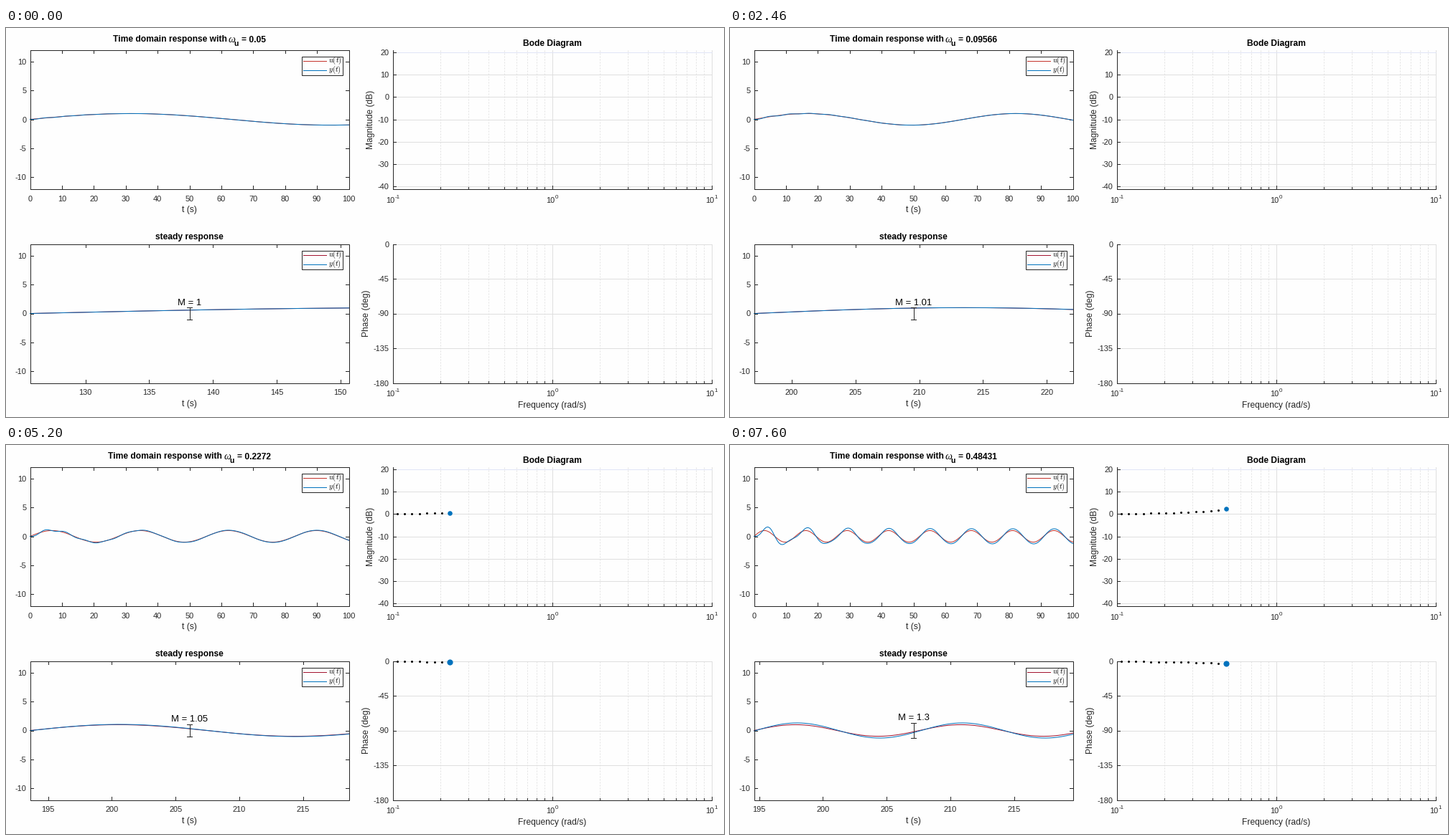
Write a matplotlib script that moves like this. It is 1000 by 543 pixels and loops after 8000 ms.

```python
import numpy as np
import matplotlib.pyplot as plt
from matplotlib.animation import FuncAnimation
from matplotlib.patches import Rectangle

plt.rcParams["font.family"] = "Liberation Sans"
plt.rcParams["mathtext.fontset"] = "cm"

W, H, PX = 1000, 543, 0.72          # stage in pixels, points per pixel
INK, PAPER = "#262626", "#fefefe"
BLUE, RED, DARK_RED = "#0072bd", "#c4342c", "#a2142f"
GRID, MINOR_GRID, TOP_GRID = "#dfdfdf", "#e2e2e2", "#e0e4f6"
ZETA = 0.05                         # damping, natural frequency is 1 rad/s
OMEGAS = np.geomspace(0.05, 10, 50)
STEP_MS, LOOP_MS = 40, 8000
CHANGES = [800, 1060, 1460, 1860, 2130, 2460, 2730, 3130, 3460, 3860, 4200,
           4530, 4860, 5200, 5660, 6000, 6330, 6530, 6860, 7200, 7600]

fig = plt.figure(figsize=(W / 100, H / 100), dpi=100, facecolor=PAPER)
ax = fig.add_axes([0, 0, 1, 1])
ax.set(xlim=(0, W), ylim=(H, 0))
ax.axis("off")


class Panel:
    """Maps data values to stage pixels inside one plot area."""

    def __init__(self, left, top, xlim, ylim):
        self.left, self.right = left, left + 444
        self.top, self.bottom = top, top + 194
        self.xlim, self.ylim = xlim, ylim

    def x(self, v):
        lo, hi = self.xlim
        return self.left + (np.asarray(v) - lo) / (hi - lo) * 444

    def y(self, v):
        lo, hi = self.ylim
        return self.bottom - (np.asarray(v) - lo) / (hi - lo) * 194


def text(x, y, s, size=11, color=INK, ha="center", **kw):
    return ax.text(x, y, s, fontsize=size * PX, color=color, ha=ha,
                   va=kw.pop("va", "baseline"), **kw)


def title(x, y, s, ha="center"):
    return text(x, y, s, 12, "black", ha, weight="bold")


def line(x, y, color=INK, width=1.0, **kw):
    return ax.plot(x, y, color=color, lw=width * PX, **kw)[0]


def dots(color, radius, zorder):
    return line([], [], color, ls="", marker="o", ms=2 * radius * PX, mew=0,
                zorder=zorder)


def join(segments):
    """Pack separate segments into one broken polyline."""
    xs, ys = [], []
    for x0, y0, x1, y1 in segments:
        xs += [x0, x1, np.nan]
        ys += [y0, y1, np.nan]
    return xs, ys


def x_ticks(p, positions, length=4.4):
    return join([s for x in positions for s in
                 ((x, p.bottom, x, p.bottom - length), (x, p.top, x, p.top + length))])


def y_labels(p, values):
    for v in values:
        text(p.left - 5, p.y(v) + 4, f"{v}", ha="right")


def legend(p, u_color):
    ax.add_patch(Rectangle((411.5, p.top + 9), 57, 26.5, fc=PAPER, ec=INK,
                           lw=PX, zorder=6))
    for dy, color, name in ((15, u_color, "u"), (28, BLUE, "y")):
        line([414, 446], [p.top + dy] * 2, color, zorder=7)
        text(449, p.top + dy, f"${name}(t)$", 10.5, "black", "left",
             va="center", zorder=7)


def time_panel(p, u_color):
    ax.add_patch(Rectangle((p.left, p.top), 444, 194, fill=False, ec=INK,
                           lw=PX, zorder=4))
    values = range(-10, 11, 5)
    line(*join([s for y in p.y(values) for s in
                ((p.left, y, p.left + 4.4, y), (p.right, y, p.right - 4.4, y))]))
    y_labels(p, values)
    text(255.5, p.bottom + 32.5, "t (s)", 12)
    legend(p, u_color)
    return line([], [], u_color, zorder=2), line([], [], BLUE, zorder=3)


def bode_panel(p, values, label, label_x):
    minors = p.x(np.log10([k / 10 for k in range(2, 10)] + list(range(2, 10))))
    for x in minors:
        line([x, x], [p.top, p.bottom], MINOR_GRID, ls=(0, (2, 2)), zorder=0)
    for x in p.x([0, 1]):
        line([x, x], [p.top, p.bottom], GRID, zorder=0)
    for v in values:
        line([p.left, p.right], [p.y(v)] * 2, TOP_GRID if v == 20 else GRID,
             zorder=0)
    line([p.left, p.left, p.right], [p.top, p.bottom, p.bottom])
    ticks = [(p.left, y, p.left + 4.4, y) for y in p.y(values)]
    ticks += [(x, p.bottom, x, p.bottom - 4.4) for x in p.x([-1, 0, 1])]
    ticks += [(x, p.bottom, x, p.bottom - 2.2) for x in minors]
    line(*join(ticks))
    y_labels(p, values)
    for power in (-1, 0, 1):
        split = p.x(power) + (2.5 if power < 0 else 4)
        text(split, p.bottom + 19, "10", ha="right")
        text(split + 0.3, p.bottom + 13, f"{power}", 8, ha="left")
    text(label_x, (p.top + p.bottom) / 2, label, 12, rotation=90, va="center")


def gain(w):
    return 1 / (1 - w**2 + 2j * ZETA * w)


def response(w, t):
    """Output of the resting second-order system driven by sin(w t)."""
    m, phi = abs(gain(w)), np.angle(gain(w))
    wd = np.sqrt(1 - ZETA**2)
    a = -m * np.sin(phi)
    b = (ZETA * a - m * w * np.cos(phi)) / wd
    decay = np.exp(-ZETA * t) * (a * np.cos(wd * t) + b * np.sin(wd * t))
    return m * np.sin(w * t + phi) + decay


full = Panel(33.5, 30.5, (0, 100), (-12, 12))
steady = Panel(33.5, 301.5, (0, 25), (-12, 12))
mag = Panel(538.5, 30.5, (-1, 1), (-41, 21))
phase = Panel(538.5, 301.5, (-1, 1), (-180, 0))

full_u, full_y = time_panel(full, RED)
steady_u, steady_y = time_panel(steady, DARK_RED)
bode_panel(mag, range(-40, 21, 10), "Magnitude (dB)", 507.5)
bode_panel(phase, range(-180, 1, 45), "Phase (deg)", 502)

line(*x_ticks(full, full.x(range(0, 101, 10))))
for v in range(0, 101, 10):
    text(full.x(v), full.bottom + 17, f"{v}")
title(255.5, 295.5, "steady response")
title(760.5, 24.5, "Bode Diagram")
text(760.5, 530, "Frequency (rad/s)", 12)

head = title(0, 19.5, "Time domain response with", "left")
omega = text(0, 19.5, "ω", 14, "black", "left", family="Liberation Serif",
             style="italic")
sub = title(0, 25, "u", "left")
sub.set_fontsize(10.5 * PX)
value = title(0, 19.5, "", "left")

steady_ticks = line([], [])
steady_labels = [text(0, steady.bottom + 17, "") for _ in range(6)]
bar = line([], [], zorder=5)
bar_text = text(255.5, 0, "", 13, "black", zorder=5)
mag_dots, phase_dots = dots("black", 1.5, 8), dots("black", 1.5, 8)
mag_head, phase_head = dots(BLUE, 3.3, 9), dots(BLUE, 4.1, 9)


def set_title(w):
    number = f"{w:.5g}"
    width = 190 + 6.67 * (len(number) - 1) + 3.33
    x = 255.5 - width / 2
    value.set_text(f"= {number}")
    for part, dx in ((head, 0), (omega, 161), (sub, 168.8), (value, 179.5)):
        part.set_x(x + dx)


def set_steady(w):
    period = 2 * np.pi / w
    start = int(200 / period) * period
    steady.xlim = (start, start + 25)
    t = np.linspace(start, start + 25, 400)
    steady_u.set_data(steady.x(t), steady.y(np.sin(w * t)))
    steady_y.set_data(steady.x(t), steady.y(response(w, t)))

    ticks = np.arange(np.ceil(start / 5) * 5, start + 25, 5)
    steady_ticks.set_data(*x_ticks(steady, steady.x(ticks)))
    for i, label in enumerate(steady_labels):
        label.set_text(f"{ticks[i]:.0f}" if i < len(ticks) else "")
        if i < len(ticks):
            label.set_x(steady.x(ticks[i]))

    m = abs(gain(w))
    x, hi, lo = 255.5, steady.y(m), steady.y(-m)
    bar.set_data(*join([(x, hi, x, lo), (x - 3.5, hi, x + 3.5, hi),
                        (x - 3.5, lo, x + 3.5, lo)]))
    bar_text.set_text(f"M = {m:.3g}")
    bar_text.set_y(steady.y(m + 1) + 4.5)


def set_bode(step):
    w = OMEGAS[:step + 1]
    w = w[w >= 0.1]
    g = gain(w)
    x = mag.x(np.log10(w))
    for panel, v, trail, tip in (
            (mag, 20 * np.log10(abs(g)), mag_dots, mag_head),
            (phase, np.degrees(np.angle(g)), phase_dots, phase_head)):
        y = panel.y(v)
        trail.set_data(x[:-1], y[:-1])
        tip.set_data(x[-1:], y[-1:])


def update(frame):
    now = (frame + 1) * STEP_MS - 1
    step = sum(now >= c for c in CHANGES)
    w = OMEGAS[step]
    t = np.linspace(0, 100, 801)
    full_u.set_data(full.x(t), full.y(np.sin(w * t)))
    full_y.set_data(full.x(t), full.y(response(w, t)))
    set_title(w)
    set_steady(w)
    set_bode(step)
    return []


anim = FuncAnimation(fig, update, frames=LOOP_MS // STEP_MS, interval=STEP_MS,
                     repeat=True, repeat_delay=0, blit=False)
plt.show()
```
